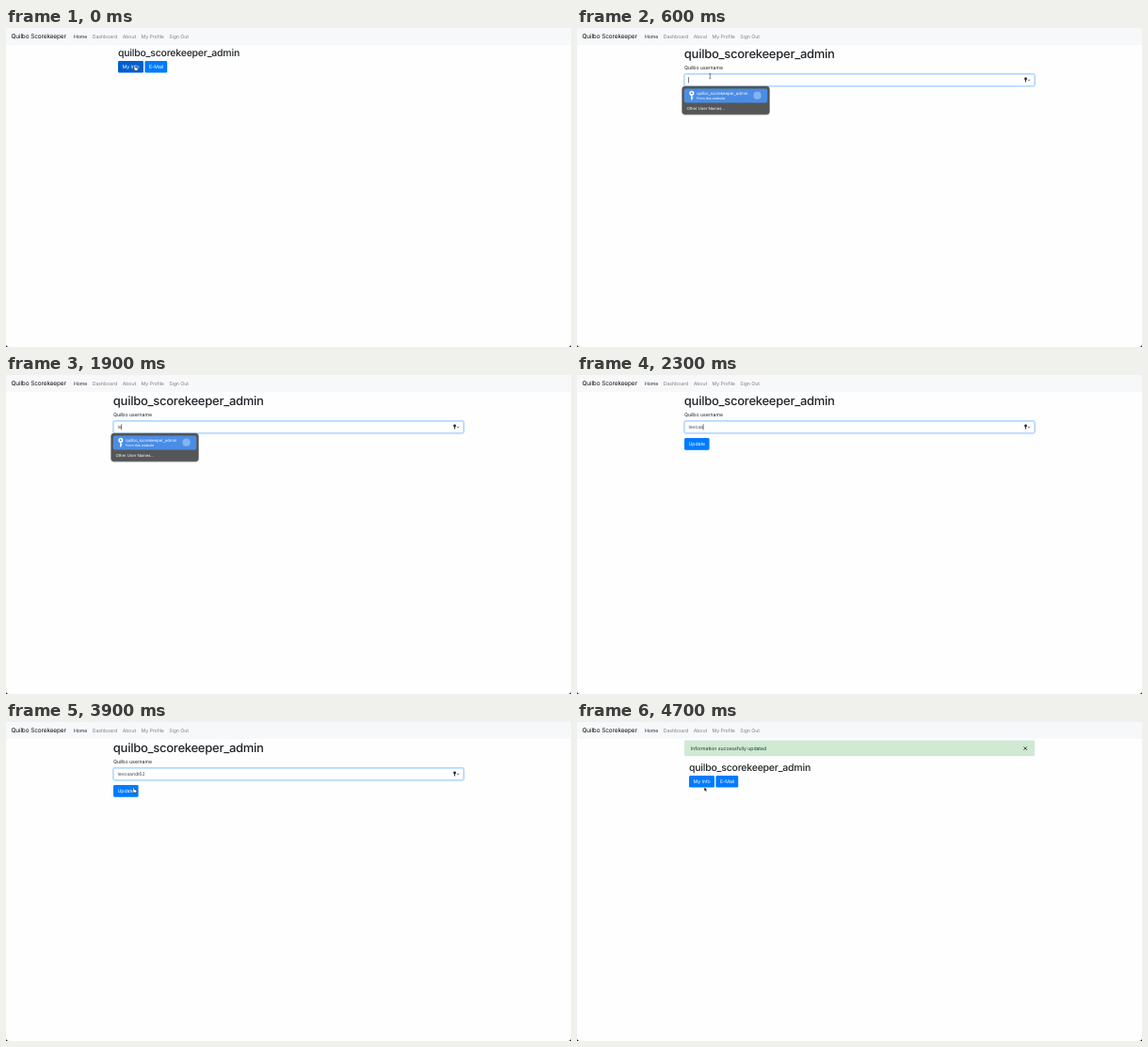
Write an HTML page that moves like this. It is 600 by 339 pixels and loops after 4900 ms.

```html
<!DOCTYPE html>
<html lang="en">
<head>
<meta charset="utf-8">
<title>Profile update</title>
<style>
  html, body { margin: 0; width: 100%; height: 100%; overflow: hidden; background: #fefefe; }
  svg { display: block; width: 100vw; height: 100vh; }
  text {
    font: 5.2px Inter, "Liberation Sans", sans-serif;
    letter-spacing: -.01em;
    text-rendering: geometricPrecision;
    fill: #212529;
    white-space: pre;
  }
  .brand { font-size: 6.5px; letter-spacing: -.02em; fill: #111; }
  .h1 { font-size: 13px; font-weight: 500; letter-spacing: -.02em; }
  .h2 { font-size: 10.5px; font-weight: 500; letter-spacing: -.02em; }
  .muted { fill: #808182; }
  .white { fill: #fff; }
</style>
</head>
<body>
<svg id="stage" viewBox="0 0 600 339" preserveAspectRatio="none"></svg>
<script>
const LOOP = 4900;
const SITE = "Quilbo Scorekeeper";
const ACCOUNT = "quilbo_scorekeeper_admin";
const USERNAME = "levosandi62";
const BLUE = "#007bff", HOVER = "#0069d9", PRESSED = "#005fcc";
const stage = document.getElementById("stage");

function add(parent, tag, attrs = {}, content = "") {
  const node = document.createElementNS("http://www.w3.org/2000/svg", tag);
  for (const key in attrs) node.setAttribute(key, attrs[key]);
  node.textContent = content;
  parent.appendChild(node);
  return node;
}
const group = (parent = stage) => add(parent, "g");
const text = (parent, x, y, content, attrs) => add(parent, "text", { x, y, ...attrs }, content);
const rect = (parent, x, y, width, height, fill, attrs) =>
  add(parent, "rect", { x, y, width, height, fill, ...attrs });
const path = (parent, d, attrs) => add(parent, "path", { d, ...attrs });
const show = (node, visible) => node.setAttribute("visibility", visible ? "visible" : "hidden");

function button(parent, x, y, width, label) {
  const face = rect(parent, x, y, width, 12.6, BLUE, { rx: 1.4 });
  text(parent, x + 4.5, y + 8.2, label, { class: "white" });
  return face;
}

// Navigation bar
rect(stage, 0, 0, 600, 339, "#fefefe");
rect(stage, 0, 0, 600, 18, "#f7f8fa");
text(stage, 5.4, 11.2, SITE, { class: "brand" });
text(stage, 72, 10.8, "Home", { fill: "#191a1a" });
[[91.8, "Dashboard"], [123.7, "About"], [143.5, "My Profile"], [173.2, "Sign Out"]]
  .forEach(([x, label]) => text(stage, x, 10.8, label, { class: "muted" }));

// Account page
const home = group();
text(home, 118.9, 29.8, ACCOUNT, { class: "h2" });
const infoButton = button(home, 119, 35, 27, "My Info");
button(home, 147.4, 35, 23.8, "E-Mail");

const notice = group();
rect(notice, 114.2, 19.7, 371.6, 16.3, "#cfe9d3", { rx: 1.4, stroke: "#c3e3c9", "stroke-width": .4 });
text(notice, 121, 29.8, "Information successfully updated", { style: "fill:#1c3f25" });
path(notice, "M474.4 26.4l3.4 3.4m0-3.4l-3.4 3.4", { stroke: "#333", "stroke-width": .9 });

// Edit form
const form = group();
text(form, 113.8, 32.4, ACCOUNT, { class: "h1" });
text(form, 114, 44.3, "Quilbo username");
const glow = rect(form, 113.6, 48.6, 372.8, 13.6, "none", { rx: 1.9, stroke: "#bfdeff", "stroke-width": 1.1 });
const field = rect(form, 114.2, 49.2, 371.6, 12.4, "#fff", { rx: 1.3, "stroke-width": .5 });
const entry = text(form, 118.5, 57.2, "", { style: "fill:#495057" });
const caret = rect(form, 0, 52.2, .6, 6.2, "#222");
const spelling = path(form, "M118.7 58.7h29.8",
  { stroke: "#b9a5a5", "stroke-width": .5, "stroke-dasharray": ".7 .7" });
const keyMenu = group(form);
add(keyMenu, "circle", { cx: 476.5, cy: 54, r: 1.4, fill: "#222" });
path(keyMenu, "M476.5 54v3.5", { stroke: "#222", "stroke-width": .9 });
path(keyMenu, "M478.9 54.9l1.2 1 1.2-1", { stroke: "#222", "stroke-width": .6, fill: "none" });
const updateButton = button(form, 114, 67.1, 26.6, "Update");

// Autofill menu
const menu = group();
rect(menu, 111, 62.6, 94, 30.4, "#000", { rx: 3.4, opacity: .12 });
rect(menu, 111.7, 62, 92.6, 29.8, "#555657", { rx: 3, stroke: "#444", "stroke-width": .4 });
rect(menu, 113.8, 64.4, 88.4, 15.1, "#4a8de6", { rx: 2 });
add(menu, "circle", { cx: 121.8, cy: 69.3, r: 1.8, fill: "none", stroke: "#fff", "stroke-width": 1.5 });
path(menu, "M121.8 71v5.4m0-2.6h1.5", { stroke: "#fff", "stroke-width": 1.3 });
text(menu, 127, 71, ACCOUNT, { class: "white", style: "font-size:4.4px" });
text(menu, 127, 76.3, "From this website", { class: "white", style: "font-size:3.7px" });
add(menu, "circle", { cx: 191.5, cy: 71.7, r: 4.1, fill: "#86b3ee" });
text(menu, 116.5, 87, "Other User Names...", { class: "white", style: "font-size:4.3px" });

// Pointer shapes, each with its hot spot at the local zero point
const pointer = group();
const shapes = {
  hand: path(pointer,
    "M0 0q.7-.2.8.6v1.7l2 .5q.8.3.7 1.1l-.4 1.8h-2.5l-1.9-2.2q.2-.7.9-.1l-.3-2.6q0-.6.7-.8z",
    { fill: "#fff", stroke: "#111", "stroke-width": .45 }),
  arrow: path(pointer, "M0 0v4.2l1-.9.7 1.6.8-.3-.7-1.6h1.3z",
    { fill: "#000", stroke: "#fff", "stroke-width": .3 }),
  beam: path(pointer, "M-1-2.6q1 0 1 .6 0-.6 1-.6m-1 .6v4m-1 .6q1 0 1-.6 0 .6 1 .6",
    { fill: "none", stroke: "#222", "stroke-width": .55 })
};

// Rounded window corners
path(stage, "M0 336v3h3q-3 0-3-3zm600 0v3h-3q3 0 3-3z", { fill: "#000" });

// Each entry: start time, then the values that hold from there on
const pointerSteps = [
  [0, "hand", 136.6, 39.6], [200, "beam", 137.5, 44.5], [500, "beam", 140, 49],
  [600, "beam", 141.3, 51.3], [800, "beam", 140.5, 56], [900, "arrow", 136, 66],
  [1000, "arrow", 141.5, 80.5], [1100, "arrow", 130, 68], [1900, ""],
  [3800, "arrow", 134, 69.5], [3900, "hand", 135.3, 69.4], [4600, "hand", 135.2, 69.3],
  [4700, "arrow", 135.2, 69.2]
];
const typingSteps = [
  [0, 0], [1900, 2], [2000, 3], [2100, 4], [2300, 6], [2400, 7],
  [2600, 8], [2700, 9], [2900, 10], [3100, 11]
];
const at = (steps, t) => steps.findLast(step => step[0] <= t).slice(1);
const between = (t, from, to) => t >= from && t < to;

function render(time) {
  const t = Math.floor((time % LOOP) / 100) * 100;
  const editing = between(t, 100, 4600);
  const focused = between(t, 500, 4300);
  const typed = at(typingSteps, t)[0];

  show(home, !editing);
  home.setAttribute("transform", `translate(0 ${t >= 4600 ? 22 : 0})`);
  infoButton.setAttribute("fill", t < 100 ? PRESSED : BLUE);
  show(notice, t >= 4600);

  show(form, editing);
  entry.textContent = USERNAME.slice(0, typed);
  caret.setAttribute("x", 118.3 + (typed ? entry.getComputedTextLength() : 0));
  const caretOn = between(t, 500, 1000) || between(t, 1500, 3600);
  caret.setAttribute("opacity", caretOn ? 1 : 0);
  glow.setAttribute("opacity", focused ? (t === 500 ? .5 : 1) : 0);
  field.setAttribute("stroke", focused ? "#69b0fb" : t >= 4300 ? "#8fc0f3" : "#ced4da");
  keyMenu.setAttribute("opacity", focused ? 1 : 0);
  spelling.setAttribute("opacity", t >= 4300 ? 1 : 0);
  updateButton.setAttribute("fill", t >= 4300 ? PRESSED : t >= 4000 ? HOVER : BLUE);

  show(menu, between(t, 600, 2100));
  menu.setAttribute("opacity", t === 2000 ? .5 : 1);

  const [kind, x = 0, y = 0] = at(pointerSteps, t);
  for (const name in shapes) show(shapes[name], name === kind);
  pointer.setAttribute("transform", `translate(${x} ${y})`);
}

const start = performance.now();
function tick() {
  render(performance.now() - start);
  requestAnimationFrame(tick);
}
tick();
</script>
</body>
</html>
```
